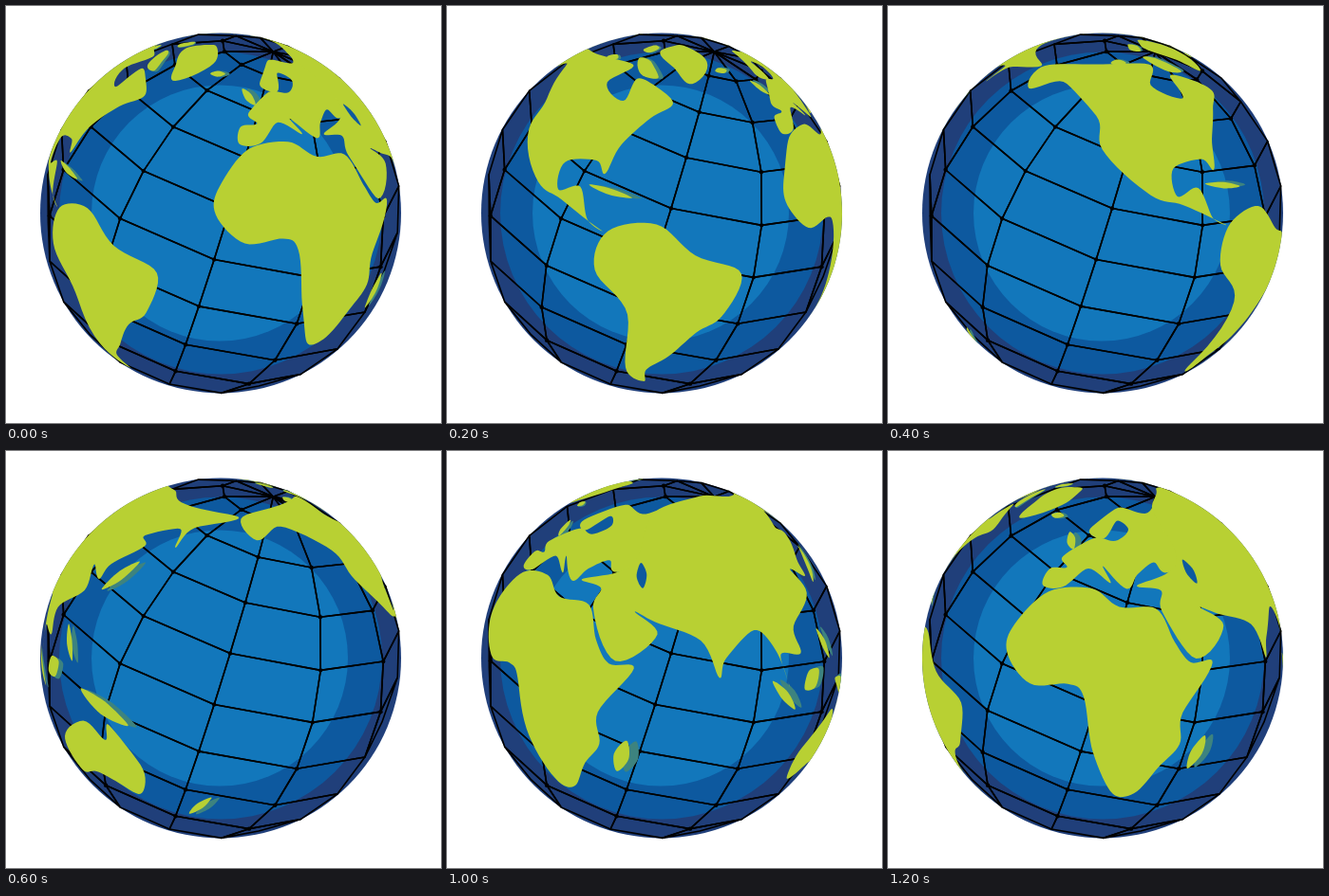
An HTML page with a canvas that plays this animation: 458x440 px, repeating every 1300 ms.

```html
<!DOCTYPE html>
<html lang="en">
<head>
<meta charset="utf-8">
<title>Turning globe</title>
<style>
html, body { margin: 0; width: 100%; height: 100%; overflow: hidden; background: #fff; }
canvas { display: block; }
</style>
</head>
<body>
<canvas id="stage" width="458" height="440"></canvas>
<script>
const ctx = document.getElementById('stage').getContext('2d');
const CX = 226, CY = 218.5, R = 190, EYE = 19.5, ZOOM = 3700, HORIZON = 1 / EYE;
const GREEN = '#b8d033', TEAL = '#3d837f', LIGHT = '#1277bb', MID = '#0d599f', DARK = '#203f7a';
const STEP = 100, STEPS = 13, SEGMENTS = 11;
const gridView = { lon: 0, tilt: 22.3, roll: 18 };
const rad = deg => deg * Math.PI / 180;

// Key points of each coast: longitude, latitude
const africa = [-6,35, 10,37, 20,31, 33,30, 38,19, 43,12, 51,11, 40,-4, 40,-15, 34,-23, 27,-34,
  19,-34, 12,-17, 9,2, 4,6, -8,5, -17,14, -16,23];
const europe = [-9,37, -8,43, -1,44, -4,48, 9,56, 20,55, 28,60, 22,64, 14,56, 6,60, 25,71, 44,67,
  62,70, 64,50, 41,42, 36,46, 28,42, 23,37, 14,45, 17,39, 8,44, -1,37];
const asia = [55,70, 104,77, 140,72, 190,66, 163,60, 157,51, 155,59, 137,54, 141,50, 129,41, 127,35,
  119,39, 122,30, 108,21, 109,12, 100,13, 103,2, 98,15, 91,22, 80,14, 77.5,8, 72,20, 57,26, 50,29,
  58,22, 45,13, 35,29, 36,36, 27,38, 41,42, 48,48];
const northAmerica = [-167,66, -128,70, -85,69, -94,59, -80,52, -77,62, -65,59, -56,52, -66,46,
  -76,36, -80,26, -84,30, -96,28, -96,19, -88,21, -84,11, -79,8, -94,16, -105,20, -121,35, -124,47,
  -145,60, -163,55];
const southAmerica = [-77,8, -62,11, -50,1, -35,-6, -40,-21, -48,-27, -57,-38, -66,-46, -68,-55,
  -75,-48, -71,-20, -81,-5];
const australia = [114,-23, 131,-12, 140,-17, 142.5,-11, 153,-26, 148,-38, 138,-34, 129,-32, 116,-35];
const greenland = [-65,79, -30,83, -22,72, -44,60, -53,68];

// Islands: both ends and half the width
const islands = [
  [-84,73, -64,63, 4], [-116,71, -103,71, 2], [-88,79, -68,81, 3], [-24,65, -14,65, 1.5],
  [-5,58, 0,51, 2], [-85,22, -70,19, 1], [49,-13, 45,-25, 2.5], [131,-1, 150,-10, 2.5],
  [110,0, 118,5, 3.5], [96,5, 106,-6, 1.5], [120,18, 126,7, 1.5], [131,32, 143,44, 2],
  [177,-36, 167,-46, 1.5]
];
const caspian = [50,46, 52,37, 2];

// Closed Catmull-Rom curve through the pairs
function smooth(flat) {
  const n = flat.length / 2, at = (i, c) => flat[(i + n) % n * 2 + c], out = [];
  for (let i = 0; i < n; i++) {
    for (let t = 0; t < 1; t += 1 / 8) {
      out.push([0, 1].map(c => {
        const [a, b, d, e] = [-1, 0, 1, 2].map(k => at(i + k, c));
        return b + t / 2 * (d - a + t * (2 * a - 5 * b + 4 * d - e + t * (3 * (b - d) + e - a)));
      }));
    }
  }
  return out;
}

function ridge([lon1, lat1, lon2, lat2, width], east = 0) {
  const dx = lon2 - lon1, dy = lat2 - lat1, k = width / Math.hypot(dx, dy);
  const x = (lon1 + lon2) / 2 + east, y = (lat1 + lat2) / 2;
  return smooth([lon1 + east, lat1, x - dy * k, y + dx * k, lon2 + east, lat2, x + dy * k, y - dx * k]);
}

function project(lon, lat, view) {
  const l = rad(lon - view.lon), p = rad(lat), s = rad(view.tilt), roll = rad(view.roll);
  const x = Math.cos(p) * Math.sin(l), depth = Math.cos(p) * Math.cos(l);
  const y = Math.sin(p) * Math.cos(s) - depth * Math.sin(s);
  const z = Math.sin(p) * Math.sin(s) + depth * Math.cos(s);
  const k = ZOOM / (EYE - z), c = Math.cos(roll), q = Math.sin(roll);
  return { x: k * (x * c + y * q), y: k * (x * q - y * c), z };
}

function disc(x, y, radius, color) {
  ctx.fillStyle = color;
  ctx.beginPath();
  ctx.arc(x, y, radius, 0, 7);
  ctx.fill();
}

function drawGrid() {
  const corner = (i, j) => project(2.5 + i * 360 / SEGMENTS, 90 - j * 180 / SEGMENTS, gridView);
  ctx.strokeStyle = '#000';
  ctx.lineWidth = 1.6;
  ctx.lineJoin = 'round';
  for (let i = 0; i < SEGMENTS; i++) {
    for (let j = 0; j < SEGMENTS; j++) {
      const quad = [corner(i, j), corner(i, j + 1), corner(i + 1, j + 1), corner(i + 1, j)];
      const [a, b, c, d] = quad;
      const front = (c.x - a.x) * (d.y - b.y) - (c.y - a.y) * (d.x - b.x) < 0;
      if (!front) continue;
      ctx.beginPath();
      quad.forEach(p => ctx.lineTo(p.x, p.y));
      ctx.closePath();
      ctx.stroke();
      if (b.z > 0.3) disc(b.x, b.y, 2.2, '#000');
    }
  }
}

// Points beyond the horizon slide out to the rim
function drawOutline(points, view, color) {
  const seen = points.map(([lon, lat]) => project(lon, lat * 0.96, view));
  if (seen.every(p => p.z < HORIZON)) return;
  ctx.fillStyle = color;
  ctx.beginPath();
  for (const p of seen) {
    const k = p.z < HORIZON ? R / Math.hypot(p.x, p.y) : 1;
    ctx.lineTo(p.x * k, p.y * k);
  }
  ctx.fill();
}

// 30 degrees a step, slower over the first two and the last two
const turn = n => 30 * n - 7.5 * (Math.min(n, 2) + Math.max(n - 10, 0));

const shoals = islands.map(island => ridge(island, 3));
const lands = [africa, europe, asia, northAmerica, southAmerica, australia, greenland].map(smooth)
  .concat(islands.map(island => ridge(island)));
const lake = ridge(caspian);
const start = performance.now();

function draw() {
  const step = Math.floor((performance.now() - start) / STEP) % STEPS;
  const view = { lon: -15.5 - turn(step), tilt: 14, roll: 1 };
  ctx.setTransform(1, 0, 0, 1, 0, 0);
  ctx.fillStyle = '#fff';
  ctx.fillRect(0, 0, 458, 440);
  ctx.translate(CX, CY);
  disc(0, 0, R, DARK);
  disc(0, 0, 170, MID);
  disc(-1, 0, 135, LIGHT);
  drawGrid();
  shoals.forEach(curve => drawOutline(curve, view, TEAL));
  lands.forEach(curve => drawOutline(curve, view, GREEN));
  drawOutline(lake, view, MID);
  requestAnimationFrame(draw);
}
draw();
</script>
</body>
</html>
```
